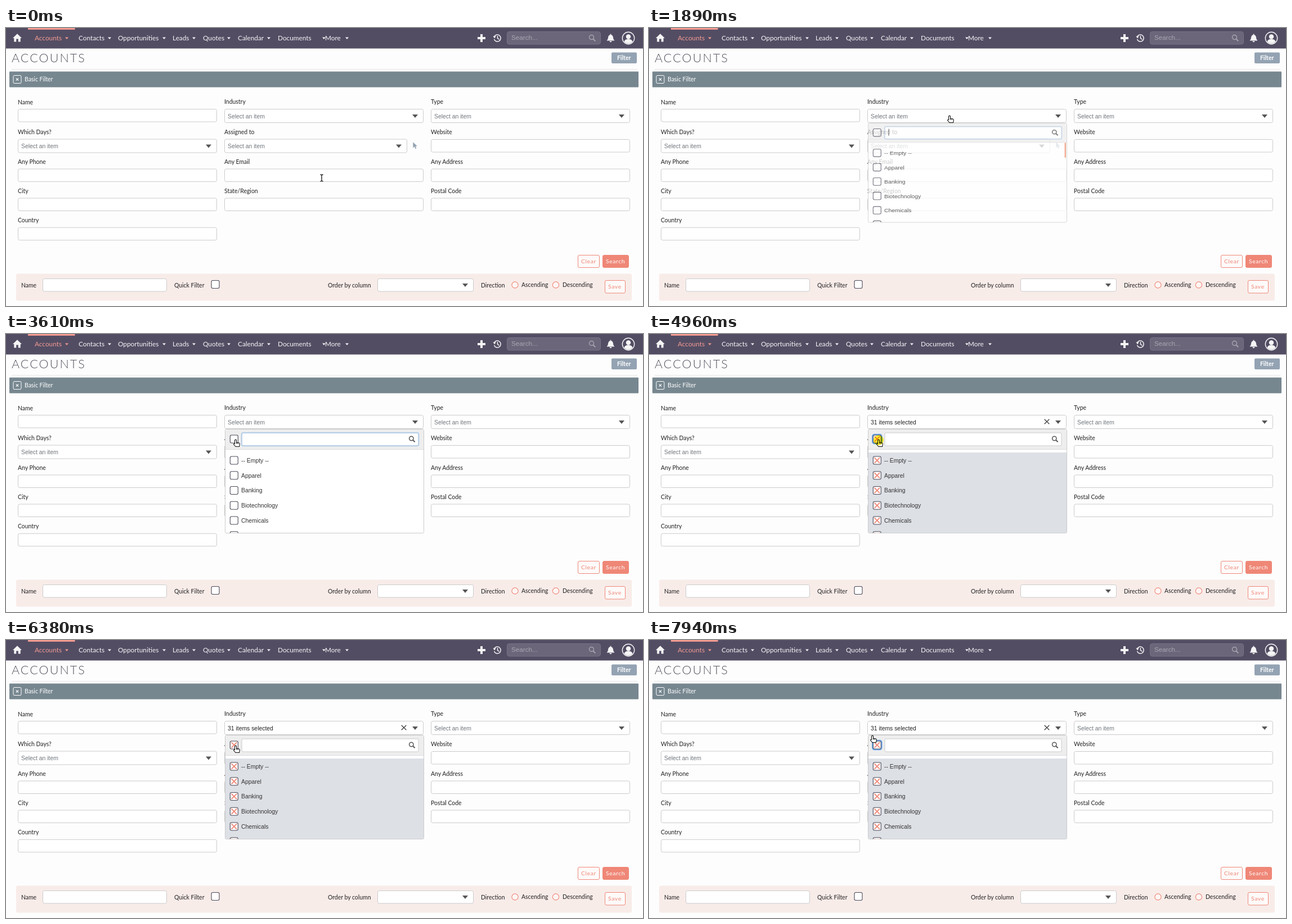
Recreate the animation shown at these times as an HTML page. Size 1132x495 px, loop 7990 ms.

```html
<!DOCTYPE html>
<html lang="en">
<head>
<meta charset="utf-8">
<title>Accounts filter</title>
<style>
html, body { margin: 0; width: 100%; height: 100%; overflow: hidden; background: #fdfdfd; }
svg { display: block; width: 100%; height: 100%; }
text { font-family: Lato, "Open Sans", sans-serif; white-space: pre; }
.arial { font-family: "Liberation Sans", Arial, sans-serif; }
</style>
</head>
<body>
<svg id="stage" viewBox="0 0 1132 495"></svg>
<script>
const LOOP = 7990;
const INK = '#222', CORAL = '#ef8777', LINE = '#cbcbcb', SLATE = '#534d64';

// Drawing helpers, each returns markup
const rect = (x, y, w, h, fill, stroke = 'none', r = 0, more = '') =>
  `<rect x="${x}" y="${y}" width="${w}" height="${h}" rx="${r}" fill="${fill}" stroke="${stroke}" ${more}/>`;
const text = (x, y, s, size = 10.45, fill = INK, more = '') =>
  `<text x="${x}" y="${y}" font-size="${size}" fill="${fill}" ${more}>${s}</text>`;
const arial = (x, y, s, fill = '#6f757b', size = 10.4, more = '') =>
  text(x, y, s, size, fill, `class="arial" ${more}`);
const path = (d, fill, stroke = 'none', width = 1, more = '') =>
  `<path d="${d}" fill="${fill}" stroke="${stroke}" stroke-width="${width}" ${more}/>`;
const circle = (x, y, r, fill, stroke = 'none', width = 1) =>
  `<circle cx="${x}" cy="${y}" r="${r}" fill="${fill}" stroke="${stroke}" stroke-width="${width}"/>`;
const group = (id, body, more = '') => `<g id="${id}" ${more}>${body}</g>`;
const caret = (x, y, w, h, fill) => path(`M${x - w} ${y}h${2 * w}l${-w} ${h}z`, fill);
const cross = (x, y, r, color, width) =>
  path(`M${x - r} ${y - r}l${2 * r} ${2 * r}m0 ${-2 * r}l${-2 * r} ${2 * r}`, 'none', color, width);
const lens = (x, y, r, color, width) =>
  circle(x, y, r, 'none', color, width) +
  path(`M${x + r * .7} ${y + r * .7}l${r} ${r}`, 'none', color, width + .5);
const field = (x, y, w = 353, h = 22.5) => rect(x + .5, y, w, h, '#fff', LINE, 3);
const select = (x, y, w = 353, hint = 'Select an item') =>
  field(x, y, w, 24) + arial(x + 6, y + 16, hint) + caret(x + w - 14, y + 9.5, 5, 6, '#555');
const box = (x, y) => rect(x - 7, y - 7, 14, 14, '#fff', '#4b4b5a', 2.5, 'stroke-width="1.1"');
const button = (x, y, w, h, label, tx, solid) =>
  rect(x + .5, y + .5, w, h, solid ? CORAL : '#fdfaf9', CORAL, 2.5) +
  text(tx, y + 15, label, 10.4, solid ? '#fff' : CORAL, 'letter-spacing=".6"');

function topBar() {
  const menus = [['Accounts', 51, 108], ['Contacts', 129, 184], ['Opportunities', 199, 281],
    ['Leads', 296, 334], ['Quotes', 350, 396], ['Calendar', 412, 467],
    ['Documents', 483, 565], ['More', 567, 606]];
  return rect(0, 0, 1132, 36.5, SLATE) + rect(39, 0, 83.5, 3, '#f29a90') +
    menus.map(([name, x, cx], i) => {
      const color = i ? '#f5f5f5' : '#f29a90';
      return text(x, 21.5, name, 11.8, color) + caret(cx, 16.5, 3, 3.4, color);
    }).join('') +
    path('M12 18L20 10.2L28 18H25.7V24.5H21.8V19.5H18.2V24.5H14.3V18z', '#f5f5f5') +
    path('M845 11v14M838 18h14', 'none', '#f5f5f5', 4) +
    path('M868 15a6 6 0 1 1-.5 5M873.5 14v4.3l3 2', 'none', '#f5f5f5', 1.5) +
    path('M865.5 14.5h5.2l-2.6 4z', '#f5f5f5') +
    rect(890.5, 6.5, 166, 22.5, '#6c667a', '#787286', 4) +
    arial(898, 21.3, 'Search...', '#aaa6b3', 11.7) + lens(1040.5, 16.5, 4, '#aaa6b3', 1.4) +
    path('M1067.5 22.5q2.6-2.2 2.6-6a4.4 4.4 0 0 1 8.8 0q0 3.8 2.6 6zM1072.5 23.3h4a2 2 0 0 1-4 0zM1073.8 10.5h1.4v2h-1.4z', '#f5f5f5') +
    circle(1106, 18, 10.7, 'none', '#f5f5f5', 1.4) + circle(1106, 15.5, 4.2, '#f5f5f5') +
    path('M1098.5 24q1.5-4.3 7.5-4.3t7.5 4.3a9.5 9.5 0 0 1-15 0z', '#f5f5f5');
}

function form() {
  const cols = [21, 388, 755];
  const label = (col, y, s) => text(cols[col], y, s);
  const heads = [
    [0, 135.5, 'Name'], [1, 135, 'Industry'], [2, 135, 'Type'],
    [0, 188.5, 'Which Days?'], [1, 188.5, 'Assigned to'], [2, 189.2, 'Website'],
    [0, 242, 'Any Phone'], [1, 242, 'Any Email'], [2, 242, 'Any Address'],
    [0, 294, 'City'], [1, 294, 'State/Region'], [2, 294, 'Postal Code'], [0, 346.2, 'Country']];
  return text(10, 60.5, 'ACCOUNTS', 21.5, '#55525e', 'font-weight="300" letter-spacing="2.1"') +
    rect(1076, 43.5, 45, 19.5, '#94a3b3', 'none', 2) +
    text(1086, 57, 'Filter', 10.4, '#fff', 'font-weight="700"') +
    rect(10, 73, 1112, 1, '#e6e6e6') +
    rect(6, 77.5, 1118, 28, '#778790', 'none', 1) +
    rect(13, 84.5, 14, 14, 'none', '#fff', 2) + cross(20, 91.5, 2.2, '#fff', 1.2) +
    text(33, 94.8, 'Basic Filter', 10.45, '#fff') +
    heads.map(h => label(...h)).join('') +
    field(21, 144.5) + select(755, 144.5) + select(21, 198) + select(388, 198, 324) +
    path('M723.3 203.3v10.2l2.5-2.3 1.8 3.8 1.8-.8-1.8-3.7h3.3z', '#94a3b3') +
    field(755, 198.5) +
    cols.map(x => field(x, 251) + field(x, 303)).join('') + field(21, 355.3) +
    button(1016, 404, 38, 22, 'Clear', 1022, false) +
    button(1060, 404, 46, 22, 'Search', 1066, true);
}

function savePanel() {
  const radio = x => circle(x, 457.5, 5.6, '#fdf6f4', CORAL, 1.1);
  return rect(18, 437.5, 1094, 48, '#f8ece9', 'none', 3) +
    text(27, 461.5, 'Name') + field(65, 446.5, 220) +
    text(299, 461.5, 'Quick Filter') + box(372, 456.5) +
    text(572, 461.5, 'Order by column') + field(660, 446.5, 170) + caret(816, 455, 5, 6, '#555') +
    text(844, 461.5, 'Direction') + radio(904.5) + text(916, 461, 'Ascending') +
    radio(977) + text(989, 461, 'Descending') +
    button(1064, 449, 36, 22.5, 'Save', 1070, false);
}

function dropdown() {
  const items = ['-- Empty --', 'Apparel', 'Banking', 'Biotechnology', 'Chemicals', ''];
  const rowY = i => 225 + 26.75 * i;
  const marks = items.map((_, i) => cross(405.3, rowY(i), 4.8, CORAL, 1.8)).join('');
  return rect(389.5, 169.5, 353, 185, '#fff', LINE, 2) +
    rect(390, 170, 352, 35.5, '#eeeeee') + rect(390, 205, 352, 1, '#dcdcdc') +
    rect(419, 176, 314, 23, '#fff', LINE, 2) +
    group('inputRing', rect(418.8, 175.8, 314.6, 23.4, 'none', '#7fb5f0', 3, 'stroke-width="2.2"')) +
    rect(425.5, 180, 1, 13, '#333', 'none', 0, 'id="textCaret"') +
    lens(720.3, 186, 3.7, '#555', 1.5) +
    group('list',
      rect(390, 211, 352, 143.5, '#dde0e5', 'none', 0, 'id="shade"') +
      items.map((s, i) => box(405.3, rowY(i)) + arial(418, rowY(i) + 3.8, s, '#333')).join('') +
      group('marks', marks), 'clip-path="url(#panel)"') +
    rect(738.6, 206, 2.4, 28, '#f0906f', 'none', 1, 'id="scrollbar"') +
    group('boxRing', rect(397.3, 179, 16, 16, '#fff', '#6aa9ee', 3.5, 'stroke-width="2.6"')) +
    box(405.3, 187) + group('allMark', cross(405.3, 187, 4.8, CORAL, 1.8));
}

const cursors =
  group('hand', path('M-1.5 6.4V.6a1.5 1.5 0 0 1 3 0V4l4.2.8q1.7.4 1.6 2L6.6 11.5H0L-3.4 7.6q-.4-1.6 1.9-1.2zM1.5 4v2.5M4 4.7v2', '#fff', '#111', 1.1)) +
  group('ibeam', path('M-2.6-6q2.6 0 2.6 1.5v9q0 1.5-2.6 1.5M2.6-6Q0-6 0-4.5M0 4.5Q0 6 2.6 6', 'none', '#fff', 2.6) +
    path('M-2.6-6q2.6 0 2.6 1.5v9q0 1.5-2.6 1.5M2.6-6Q0-6 0-4.5M0 4.5Q0 6 2.6 6', 'none', '#111', 1.3)) +
  group('arrow', path('M0 0v11l2.6-2.3 1.8 4 1.8-.8-1.8-3.9h3.5z', '#111', '#fff', .8));

const stage = document.getElementById('stage');
stage.innerHTML =
  `<defs><clipPath id="panel">${rect(390, 206, 352, 148.3, '#000')}</clipPath></defs>` +
  rect(0, 0, 1132, 495, '#fdfdfd') + topBar() + form() + savePanel() +
  group('empty', select(388, 144.5)) +
  group('filled', select(388, 144.5, 353, '') + arial(394, 160.5, '31 items selected', INK) +
    cross(707, 156, 4.3, '#444', 1.4)) +
  group('drop', dropdown()) + group('cursor', cursors) +
  `<circle id="click" r="9" fill="#fff02e" style="mix-blend-mode:multiply"/>`;

const el = {};
stage.querySelectorAll('[id]').forEach(node => el[node.id] = node);
const fade = (name, v) => el[name].setAttribute('opacity', v);
const show = (name, on) => el[name].setAttribute('visibility', on ? 'visible' : 'hidden');

// Linear interpolation over [time, value...] keys
function track(keys, t) {
  if (t <= keys[0][0]) return keys[0].slice(1);
  const i = keys.findIndex(k => k[0] > t);
  if (i < 0) return keys[keys.length - 1].slice(1);
  const [a, b] = [keys[i - 1], keys[i]], p = (t - a[0]) / (b[0] - a[0]);
  return a.slice(1).map((v, n) => v + (b[n + 1] - v) * p);
}

// cubic-bezier(0, 0, .2, 1)
function easeOut(x) {
  let lo = 0, hi = 1;
  for (let i = 0; i < 20; i++) {
    const s = (lo + hi) / 2;
    if (.6 * s * s + .4 * s ** 3 < x) lo = s; else hi = s;
  }
  return lo * lo * (3 - 2 * lo);
}

const OPEN = 1840;
const CLICKS = [1560, 3530, 4960, 6270];
const ROUTE = [[450, 561, 267], [690, 551, 225], [890, 529, 174], [1010, 535, 158],
  [1290, 535, 158], [1310, 534, 157], [2290, 534, 157], [2450, 516, 164], [2770, 444, 181],
  [3050, 408, 189], [6870, 408, 189], [7050, 391, 177], [7250, 391, 177],
  [7570, 425, 173], [7930, 397, 171]];
const INPUT_RING = [[1840, 0], [2020, 1], [3530, 1], [3610, .42], [3710, .42], [3720, 0]];
const BOX_RING = [[3720, 0], [3810, 1], [4970, 1], [5060, 0], [5200, 1],
  [6270, 1], [6370, 0], [6385, 0], [6510, 1]];
const SCROLLBAR = [[3050, 1], [3370, 0]];

function pointer(x, y, t) {
  if (t >= OPEN) return y >= 176 && x >= 419 ? 'ibeam' : 'hand';
  if (y > 250) return 'ibeam';
  return y < 169 || (y > 197 && y < 223) ? 'hand' : 'arrow';
}

function draw(t) {
  const [x, y] = track(ROUTE, Math.floor((t - 10) / 40) * 40 + 10).map(Math.round);
  const kind = pointer(x, y, t);
  for (const name of ['hand', 'ibeam', 'arrow']) show(name, name === kind);
  el.cursor.setAttribute('transform', `translate(${x} ${y})`);
  el.click.setAttribute('cx', x);
  el.click.setAttribute('cy', y);
  show('click', CLICKS.some(c => t >= c && t < c + 80));

  const age = Math.floor((t - OPEN) / 50) * 50;
  const p = easeOut(Math.min(1, Math.max(0, age / 120)));
  fade('drop', t < OPEN ? 0 : p);
  el.drop.setAttribute('transform', `translate(0 169) scale(1 ${.8 + .2 * p}) translate(0 -169)`);

  const chosen = (t >= 3720 && t < 5060) || t >= 6375;
  for (const name of ['filled', 'shade', 'marks', 'allMark']) show(name, chosen);
  show('empty', !chosen);
  fade('inputRing', track(INPUT_RING, t)[0]);
  fade('boxRing', track(BOX_RING, t)[0]);
  fade('scrollbar', track(SCROLLBAR, Math.floor((t - 3050) / 80) * 80 + 3050)[0]);
  show('textCaret', t < 2530 || (t >= 3030 && t < 3530));
}

function tick() {
  draw(performance.now() % LOOP);
  requestAnimationFrame(tick);
}
tick();
</script>
</body>
</html>
```
